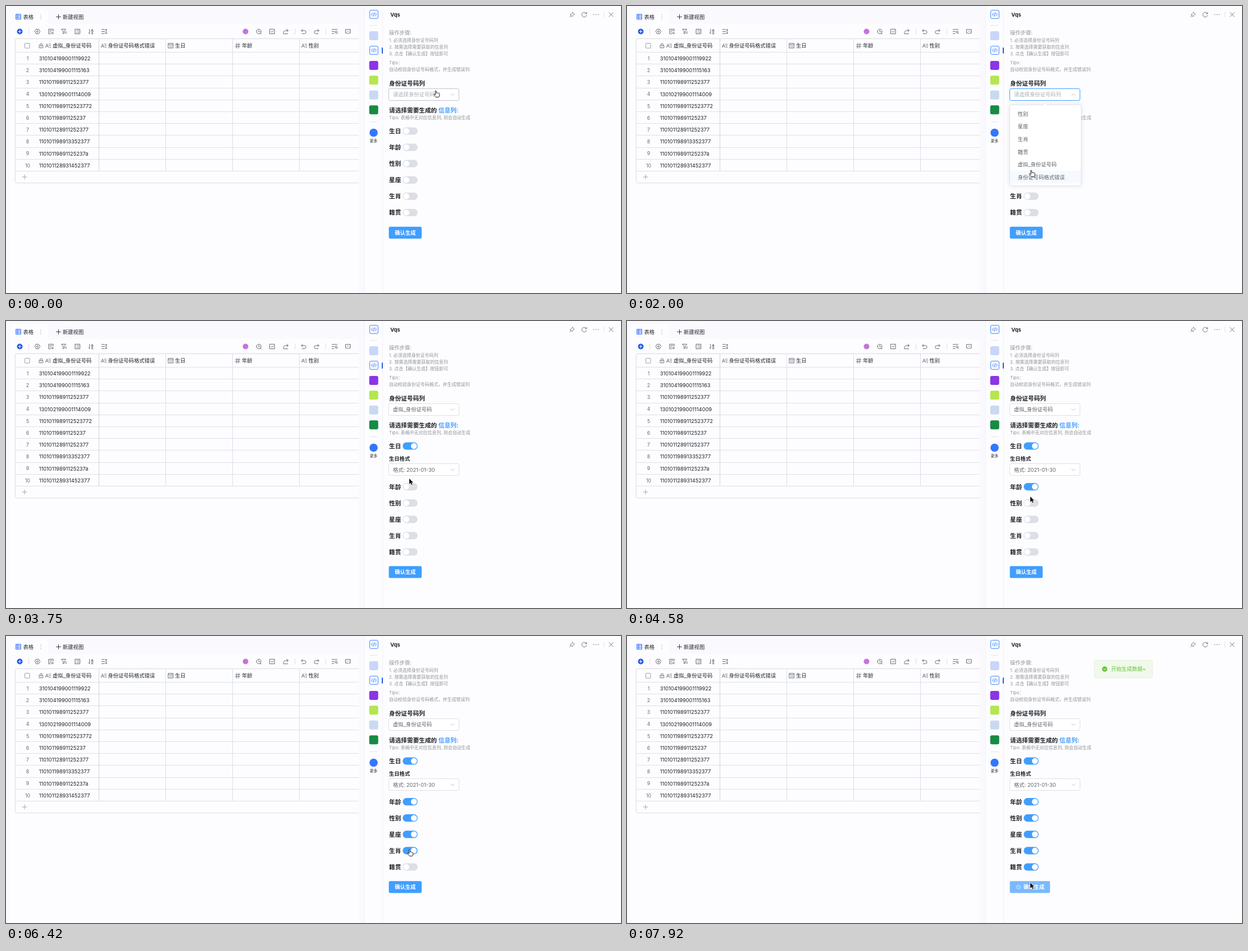
Animation of 1095x512 px, one loop 8000 ms. Source, as an HTML page with a canvas:

```html
<!DOCTYPE html>
<html lang="zh-CN">
<head>
<meta charset="utf-8">
<title>Table panel</title>
<style>
html, body { margin: 0; width: 100%; height: 100%; overflow: hidden; background: #fdfdff; }
canvas { display: block; width: 1095px; height: 512px; }
</style>
</head>
<body>
<canvas id="stage" width="1095" height="512"></canvas>
<script>
const ctx = document.getElementById('stage').getContext('2d');
const LOOP = 8000, STEP = 1000 / 12;
const FONT = 'Inter, "Noto Sans CJK SC", "Noto Sans CJK", "Noto Sans", sans-serif';
const BLUE = '#409eff', INK = '#1f2329', GREY = '#646a73', SOFT = '#909399', BODY = '#606266';
const LINE = '#dcdfe6', PAPER = '#fdfdff';
const SMALL = 7.98, NORMAL = 9.31, LARGE = 10.67;

const clamp = v => Math.max(0, Math.min(1, v));
const ease = v => { v = clamp(v); return 1 - (1 - v) ** 2 * (1 - v * 0.4); };
const mix = (a, b, p) => a + (b - a) * p;

// Pointer path: time, x, y of the hot spot.
const path = [
  [0, 765, 151], [300, 765, 151], [580, 753, 181], [667, 747, 183], [833, 739, 205],
  [1250, 719, 284], [1333, 719, 284], [1583, 719, 301], [1917, 719, 301], [2000, 719.5, 293],
  [2083, 719, 287], [2330, 719, 285], [2667, 719, 222], [2833, 718, 219], [3250, 718, 221],
  [3583, 718, 252], [3750, 718, 281], [3917, 718, 294], [4250, 718, 296], [4417, 718, 301],
  [4750, 718, 325], [5083, 718, 325], [5333, 718, 353], [5750, 718, 353], [6083, 718, 381],
  [6417, 718, 381], [6667, 718, 415], [7083, 718, 415], [7333, 718, 440], [8000, 718, 440]
];
const OPEN_AT = 110, PICK_AT = 2300, BLUR_AT = 2880, LOAD_AT = 7560, TOAST_AT = 7500;
const switches = [['生日', 2890], ['年龄', 4060], ['性别', 4850], ['星座', 5430], ['生肖', 6170], ['籍贯', 6760]];
const options = ['性别', '星座', '生肖', '籍贯', '虚拟_身份证号码', '身份证号码格式错误'];
const numbers = [
  '310104199001119922', '310104199001115163', '110101198911252377', '130102199001114009',
  '1101011989112523772', '11010119891125237', '110101128911252377', '110101198913352377',
  '11010119891125237a', '110101128931452377'
];

function pointerAt(t) {
  const i = Math.max(1, path.findIndex(k => k[0] >= t));
  const [a, b] = [path[i - 1], path[i]];
  const p = clamp((t - a[0]) / (b[0] - a[0]));
  return { x: mix(a[1], b[1], p), y: mix(a[2], b[2], p) };
}

function text(s, x, cy, size = NORMAL, color = INK, weight = 400, align = 'left') {
  ctx.font = `${weight} ${size}px ${FONT}`;
  ctx.fillStyle = color;
  ctx.textAlign = align;
  ctx.fillText(s, x, cy + size * 0.37);
}

function box(x, y, w, h, r, fill, stroke, width = 1) {
  ctx.beginPath();
  ctx.roundRect(x, y, w, h, r);
  if (fill) { ctx.fillStyle = fill; ctx.fill(); }
  ctx.shadowColor = 'transparent';
  if (stroke) { ctx.strokeStyle = stroke; ctx.lineWidth = width; ctx.stroke(); }
}

function shadow(color, blur) {
  ctx.shadowColor = color;
  ctx.shadowBlur = blur;
}

function disc(x, y, r, fill) {
  ctx.beginPath();
  ctx.arc(x, y, r, 0, Math.PI * 2);
  ctx.fillStyle = fill;
  ctx.fill();
}

function icon(d, x, y, stroke = GREY, width = 0.9, fill, scale = 1) {
  const shape = new Path2D(d);
  ctx.save();
  ctx.translate(x, y);
  ctx.scale(scale, scale);
  ctx.lineJoin = ctx.lineCap = 'round';
  if (fill) { ctx.fillStyle = fill; ctx.fill(shape); }
  if (stroke) { ctx.strokeStyle = stroke; ctx.lineWidth = width; ctx.stroke(shape); }
  ctx.restore();
}

const ring = r => `M${-r} 0a${r} ${r} 0 1 0 ${2 * r} 0a${r} ${r} 0 1 0 ${-2 * r} 0`;
const PLUS = 'M-4 0h8M0-4v8';
const SHEET = 'M-4.5-4.5h9v9h-9z';
const TEXT_FIELD = 'M-5 3.5L-2.2-3.5 .5 3.5M-4.1 1.2h3.7M1.2-3h3.8M1.8 0h3.2M2.6 3h2.4';
const HASH = 'M-1.3-4.5l-1 9M2.3-4.5l-1 9M-4-1.7h8.4M-4.5 1.7h8.4';
const CODE = 'M-2.3-2.2L-4.5 0l2.2 2.2M2.3-2.2L4.5 0 2.3 2.2M.8-2.9L-.8 2.9';
const HAND = 'M-1 1Q-1 0 0 0 1 0 1 1L1.3 4.3Q2.6 3.6 3.4 4.6 4.8 4 5.4 5.2 7 5 7 6.6L6.6 9Q6.4 10.3 5.6 11.6H.6L-3 7.4Q-3.6 5.8-2 6L-.4 7.2z';
const ARROW = 'M0 0V10L2.4 7.8 4 11.4 5.6 10.7 4.1 7.2H7z';

const tools = [
  [56, 'M-2.5-4.4h5L5 0 2.5 4.4h-5L-5 0z' + ring(1.7)],
  [80, 'M4.5-1v-3.5h-9v9h4M-2.2-1.8h4.5M-2.2 1h2M1.5 3a1.6 1.6 0 1 0 3.2 0a1.6 1.6 0 1 0-3.2 0'],
  [103, 'M-4.5-4.5h8.5L1-.8v4L-1.5 4.5V-.8zM3 1h2M3 3.5h2'],
  [127.5, SHEET + 'M-2.5-1.8h.3M-.5-1.8h3M-2.5 1.6h.3M-.5 1.6h3'],
  [151.5, 'M-3-4.5v9l-1.7-2M.4-.6L2.2-4.6 4-.6M1-1.8h2.4M.6 1h3.2L.6 4.5h3.4'],
  [175, 'M-5-4h5.5M-5 0h5.5M-5 4h5.5M3.5-4.2v8.4M2-2.7l1.5-1.6L5-2.7M2 2.7l1.5 1.6L5 2.7'],
  [450, ring(4.4) + 'M0-2.4V.4h2.4M2.5 3l2.5 2'],
  [474, SHEET + 'M-2.2 0L-.5 1.8 2.4-1.7'],
  [498, 'M-4.5 3Q-4.2-2 .5-2H4.5M2-4.7L4.8-2 2 .7M-4.5 4.5h8.5'],
  [530, 'M-2-4.2L-4.5-1.8-2 .6M-4.5-1.8H1.5a3 3 0 0 1 0 6H-3'],
  [553, 'M2-4.2L4.5-1.8 2 .6M4.5-1.8H-1.5a3 3 0 0 0 0 6H3'],
  [585, 'M-5-4H5M-5 0h4M-5 4h4M1 1a2 2 0 1 0 4 0a2 2 0 1 0-4 0M4.4 2.7L5.6 4'],
  [609, 'M-4.5-4h9v7H1.5L0 4.5-1.5 3h-3zM-2-.5h.2M0-.5h.2M2-.5h.2']
];

function drawTable() {
  ctx.fillStyle = '#f9f9fe';
  ctx.fillRect(0, 0, 638, 512);
  box(6, 32, 622, 490, 0, PAPER);
  box(6, 6, 69, 34, [5, 5, 0, 0], PAPER);
  icon('M-4.3-4.3h8.6v8.6h-8.6zM-4.3-1.4h8.6M-4.3 1.5h8.6M-1.2-4.3v8.6', 22, 19.2, '#3370ff', 1.1);
  text('表格', 30.5, 19.4, NORMAL, INK, 500);
  [15.7, 19.2, 22.7].forEach(y => disc(62, y, 0.65, SOFT));
  icon(PLUS, 93.5, 19.3, INK);
  text('新建视图', 101, 19.4);

  disc(24.5, 45.5, 5, '#2459e6');
  icon('M-2.4 0h4.8M0-2.4v4.8', 24.5, 45.5, '#fff', 1);
  tools.forEach(([x, d]) => icon(d, x, 45.5, '#50565f', 0.95, null, 0.92));
  disc(426.5, 45.5, 5, '#c673df');
  [40.5, 514.5, 569.5].forEach(x => icon('M0-5v10', x, 45.5, LINE, 1));

  ctx.save();
  ctx.beginPath();
  ctx.rect(0, 50, 628, 300);
  ctx.clip();
  shadow('rgba(31,35,41,.1)', 3);
  box(16.5, 58.5, 640, 257, 3, PAPER, '#dfe0e8');
  ctx.fillStyle = '#dfe0e6';
  for (let i = 0; i <= 10; i++) ctx.fillRect(17, Math.round(82 + i * 21.2), 611, 1);
  ctx.fillStyle = '#dcdcec';
  [284, 403, 522].forEach(x => ctx.fillRect(x, 59, 1, 235));
  ctx.fillStyle = '#cfd0da';
  ctx.fillRect(165, 59, 1, 235);
  ctx.restore();

  box(33.5, 66.5, 8.6, 8.6, 1, null, '#8f959e', 0.9);
  icon('M-3.2-.5h6.4v4.5h-6.4zM-1.8-.5v-1.7a1.8 1.8 0 0 1 3.6 0v1.7M0 1.2v1', 62.5, 70.7);
  [75, 174, 531].forEach(x => icon(TEXT_FIELD, x, 70.8, GREY, 0.95, null, 0.92));
  icon('M-4.2-4.2h8.4v8.4h-8.4zM-4.2-2h8.4M-2 .2h1M1 .2h1M-2 2.2h1M1 2.2h1', 293.3, 70.8);
  icon(HASH, 412.5, 70.8);
  [[83, '虚拟_身份证号码'], [181.4, '身份证号码格式错误'], [301, '生日'], [420, '年龄'], [538.5, '性别']]
    .forEach(([x, s]) => text(s, x, 70.9));
  numbers.forEach((n, i) => {
    const y = 93.5 + i * 21.2;
    text(i + 1, 38.5, y, 8.7, GREY, 400, 'center');
    text(n, 58.7, y, 9.27);
  });
  icon(PLUS, 33, 305, SOFT, 0.8);
}

function codeBadge(y) {
  box(647.5, y - 7.5, 15, 15, 2.5, '#f0f5ff', '#4a8fff');
  icon(CODE, 655, y, '#3370ff', 0.9);
}

function drawSidebar() {
  ctx.fillStyle = PAPER;
  ctx.fillRect(638, 0, 457, 512);
  ctx.fillStyle = '#f0f0f7';
  ctx.fillRect(638, 0, 1, 512);
  ctx.fillRect(670, 0, 1, 512);
  codeBadge(15);
  codeBadge(79);
  ['#c9d6fa', null, '#8b35e5', '#b5e650', '#c9d9f2', '#168b43'].forEach((c, i) => {
    if (c) box(646.7, 45 + i * 26.45, 16, 16, 3, c);
  });
  box(669, 74, 2, 11, 1, '#245bdb');
  [34.5, 206.5].forEach(y => icon('M-6.5 0h13', 654.5, y, LINE, 0.8));
  disc(654.5, 226, 7.3, '#3377ff');
  text('更多', 654.5, 240.5, 6.7, INK, 400, 'center');
}

function drawGuide() {
  text('Vqs', 684.3, 15.3, NORMAL, INK, 700);
  icon('M.5-4.2L4.2-.5 2.6 0 .6 2 .2 3.8-3.8-.2-2-.6 0-2.6zM-2 2L-4.4 4.4', 1008, 15.3);
  icon('M4-1.6A4.3 4.3 0 1 0 4.2 1.4M4.3-4.2v2.7H1.6', 1029.5, 15.3);
  [1046.5, 1050.5, 1054.5].forEach(x => disc(x, 15.3, 0.8, GREY));
  icon('M0-5v10', 1064.5, 15.3, LINE, 0.8);
  icon('M-3.7-3.7l7.4 7.4M3.7-3.7l-7.4 7.4', 1077.5, 15.3);

  text('操作步骤:', 682, 47.8, NORMAL, SOFT);
  [['1. 必须选择身份证号码列', 61.3], ['2. 按需选择需要获取的信息列', 73.2], ['3. 点击【确认生成】按钮即可', 85.2],
    ['Tips：', 101], ['自动校验身份证号码格式，并生成错误列', 113], ['Tips: 表格中无对应信息列, 则会自动生成', 199]]
    .forEach(([s, y]) => text(s, 682, y, SMALL, SOFT));
  text('身份证号码列', 682, 138.5, LARGE, INK, 700);
  text('请选择需要生成的', 682, 186, LARGE, INK, 700);
  text('信息列:', 770, 186, LARGE, BLUE, 700);
}

function drawSelect(y, label, color, border, turn = 0) {
  box(681.5, Math.floor(y - 10.5) + 0.5, 125, 21, 2.6, '#fff', border);
  text(label, 689, y, NORMAL, color);
  ctx.save();
  ctx.translate(795, y);
  ctx.rotate(turn * Math.PI);
  icon('M-3.3-1.6L0 1.7 3.3-1.6', 0, 0, '#b4b8c0', 0.8);
  ctx.restore();
}

function drawSwitch(label, y, p) {
  text(label, 682, y, LARGE, INK, 600);
  const rgb = [[220, 64], [223, 158], [230, 255]].map(([a, b]) => Math.round(mix(a, b, p)));
  box(706.3, y - 6.6, 26.6, 13.2, 6.6, `rgb(${rgb})`);
  disc(mix(712.7, 726.3, p), y, 5.3, '#fff');
}

function drawButton(y, hover, loading, t) {
  box(681.6, y - 10.65, loading ? 71.6 : 58.5, 21.3, 2.6, loading ? '#7ab9ff' : hover ? '#6fb4ff' : BLUE);
  text('确认生成', loading ? 706 : 692.3, y, NORMAL, '#fff', 600);
  if (!loading) return;
  const spin = (t - LOAD_AT) / 2000 * Math.PI * 2;
  ctx.save();
  ctx.translate(697, y);
  ctx.rotate(spin);
  for (let i = 0; i < 8; i++) {
    icon('M0-2.3v-1.6', 0, 0, '#fff', 0.8);
    ctx.rotate(Math.PI / 4);
  }
  ctx.restore();
}

function drawDropdown(p, active) {
  if (p <= 0) return;
  ctx.save();
  ctx.globalAlpha = p;
  ctx.translate(0, 177);
  ctx.scale(1, p);
  ctx.translate(0, -177);
  shadow('rgba(0,0,0,.12)', 8);
  box(681.5, 176.5, 127, 144, 2.6, '#fff', '#e4e7ed');
  icon('M-4 .5L0-3.7 4 .5', 744.5, 177, '#e4e7ed', 0.8, '#fff');
  options.forEach((s, i) => {
    const y = 192.5 + i * 22.55;
    if (i === active) box(682, y - 11.3, 126, 22.6, 0, '#f6f9fd');
    text(s, 695.7, y, NORMAL, BODY);
  });
  ctx.restore();
}

function drawToast(t) {
  const p = ease((t - TOAST_AT) / 300);
  if (p <= 0) return;
  ctx.save();
  ctx.globalAlpha = p;
  ctx.translate(0, -20 * (1 - p));
  box(832, 43, 103.5, 31.7, 2.6, '#f0f9eb', '#e1f3d8', 0.8);
  disc(850.5, 59, 4.7, '#67c23a');
  icon('M-2.1 0L-.5 1.6 2.2-1.3', 850.5, 59, '#fff', 1);
  text('开始生成数据~', 862, 59, NORMAL, '#67c23a');
  ctx.restore();
}

function draw(t) {
  const { x, y } = pointerAt(t);
  const opened = ease((t - OPEN_AT) / 300) * (1 - ease((t - PICK_AT) / 300));
  const focused = t > OPEN_AT - 60 && t < BLUR_AT;
  const expanded = t >= switches[0][1];
  const shift = expanded ? 43.5 : 0;
  const picked = t >= PICK_AT, loading = t >= LOAD_AT;
  const buttonY = 404.3 + shift;
  const rowY = i => 223 + i * 29.1 + (i ? shift : 0);

  drawTable();
  drawSidebar();
  drawGuide();
  const onSelect = Math.abs(y - 158) < 10.5;
  drawSelect(158, picked ? options[4] : '请选择身份证号码列', picked ? BODY : '#a8abb2',
    focused ? BLUE : onSelect ? '#c0c4cc' : LINE, opened);
  switches.forEach(([label, at], i) => drawSwitch(label, rowY(i), ease((t - at) / 300)));
  if (expanded) {
    text('生日格式', 682, 246, NORMAL, INK, 700);
    drawSelect(265.3, '格式: 2021-01-30', BODY, LINE);
  }
  const onButton = Math.abs(y - buttonY) < 10.5;
  drawButton(buttonY, onButton, loading, t);

  // Row highlight trails the pointer slightly.
  const active = Math.floor((pointerAt(t - 30).y - 181.2) / 22.55);
  drawDropdown(opened, active);
  drawToast(t);

  const onOption = opened > 0.3 && y > 181 && y < 317;
  const onSwitch = switches.some((s, i) => Math.abs(y - rowY(i)) < 7);
  const onFormat = expanded && Math.abs(y - 265.3) < 10.5;
  const hand = !loading && (onSelect || onOption || onSwitch || onFormat || onButton);
  if (hand) icon(HAND, x, y, '#222', 1, '#fff');
  else {
    icon(ARROW, x, y, '#fff', 1.4);
    icon(ARROW, x, y, null, 0, '#111');
  }
}

const start = performance.now();
function tick() {
  const t = (performance.now() - start) % LOOP;
  draw(Math.floor((t + 4) / STEP) % 96 * STEP);
  requestAnimationFrame(tick);
}
tick();
</script>
</body>
</html>
```
